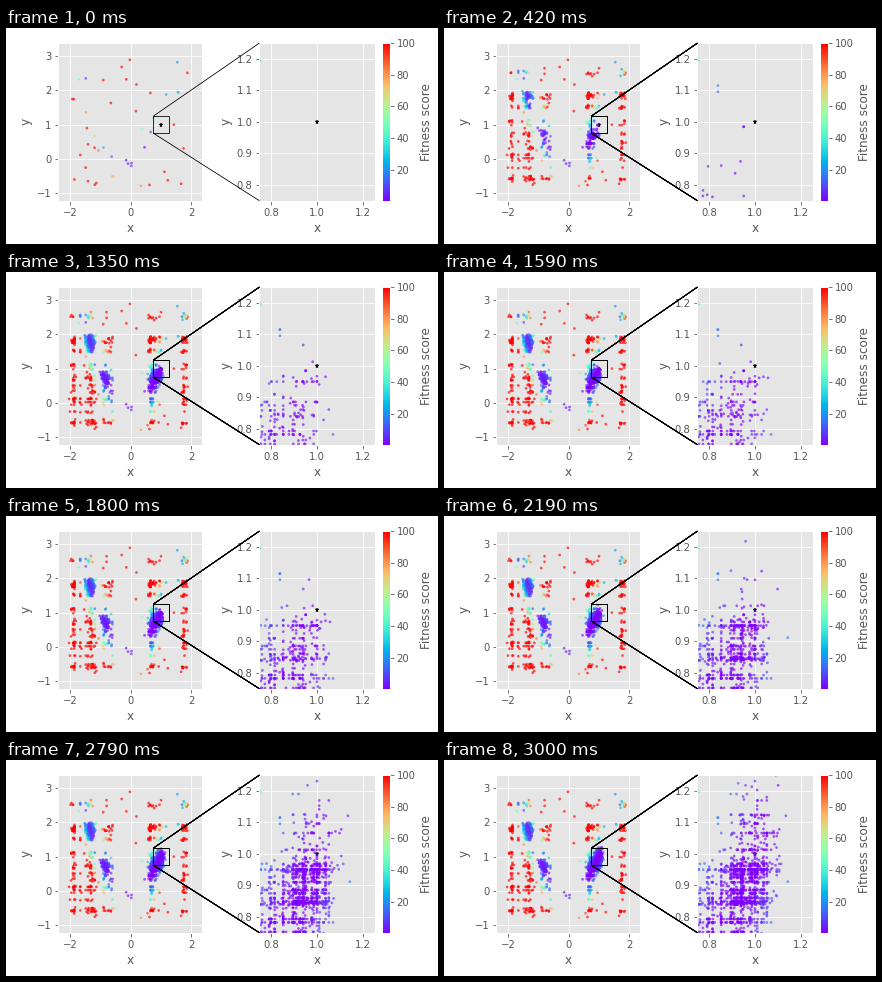
These frames come from a looping animation (432 by 216 pixels, 3030 ms). A matplotlib script:

```python
import numpy as np
import matplotlib.pyplot as plt
from matplotlib.animation import FuncAnimation
from matplotlib.cm import ScalarMappable
from matplotlib.colors import Normalize
from mpl_toolkits.axes_grid1.inset_locator import mark_inset

W, H, DPI = 432, 216, 72
FRAMES, STEP = 101, 30
POPULATION = 48
rng = np.random.default_rng(11)


def score(x, y):
    """Rosenbrock function, lowest at (1, 1)."""
    return (1 - x) ** 2 + 100 * (y - x * x) ** 2


def pool(mids, spread, each):
    """Genes scattered around a few centres."""
    return rng.normal(np.repeat(mids, each), spread)


def near(genes, mid, spread, n=300):
    """Genes drawn more often the closer they lie to mid."""
    p = np.exp(-((genes - mid) / spread) ** 2 / 2)
    return rng.choice(genes, n, p=p / p.sum())


def breed(first, last, n, xs, ys, temp=None, mutate=.35, sigma=.035):
    """Cross x and y genes, mutate some, keep mostly the fitter children."""
    m = n * 30 if temp else n
    x, y = rng.choice(xs, m), rng.choice(ys, m)
    x = x + rng.normal(0, sigma, m) * (rng.random(m) < mutate)
    y = y + rng.normal(0, sigma, m) * (rng.random(m) < mutate)
    if temp:
        fit = rng.random(m) < np.exp(-score(x, y) / temp)
        x, y = x[fit][:n], y[fit][:n]
    born = rng.integers(first, last + 1, len(x))
    return np.column_stack([born, x, y])


founders = np.column_stack([np.zeros(POPULATION),
                            rng.uniform(-2, 1.95, POPULATION),
                            rng.uniform(-.85, 2.9, POPULATION)])
cols = np.r_[pool([-1.9, -1.3, -1.3, -.85, .72, .72, 1.75], [.09], 5),
             founders[::8, 1], 1]
rows = np.r_[pool([2.6, 1.8, 1.8, 1.55, 1.1, .7, .4, 0, -.6], [.06], 4),
             founders[::8, 2]]
families = [founders,
            breed(1, 14, 380, cols, rows),
            breed(15, 34, 130, cols, rows),
            breed(5, 34, 90, pool(-1.32, .12, 14), pool(1.8, .14, 14), 30),
            breed(10, 38, 120, pool(-.85, .06, 14), pool(.7, .1, 14), 12)]

# The swarm climbs the valley y = x² towards the optimum
valley_x, valley_y = pool(.9, .13, 45), pool(.9, .22, 45)
for g in range(8, FRAMES, 8):
    mid = .68 + .0035 * g
    xs = np.r_[near(valley_x, mid, .1), np.full(g // 2, 1.0)]
    ys = np.r_[near(valley_y, mid ** 2, .15), np.full(g // 2, .95)]
    families.append(breed(g, min(g + 7, FRAMES - 1), 120 + g, xs, ys, 9))

births = np.vstack(families)
births = births[np.argsort(births[:, 0], kind="stable")]
born, points = births[:, 0], births[:, 1:]

norm = Normalize(.3, 100)
colors = plt.get_cmap("rainbow")(norm(score(*points.T)))
colors[:, 3] = .65
inside = np.all(np.abs(points - 1) < .26, axis=1)

plt.style.use("ggplot")
fig = plt.figure(figsize=(W / DPI, H / DPI), dpi=DPI, facecolor="white")


def panel(left, right):
    top, bottom = 15.1, 172.7
    return fig.add_axes([left / W, 1 - bottom / H,
                         (right - left) / W, (bottom - top) / H])


full, zoom, bar = panel(52.4, 196.2), panel(253.4, 368.5), panel(376.1, 383.7)
full.set(xlim=(-2.397, 2.364), ylim=(-1.215, 3.375), xticks=[-2, 0, 2],
         yticks=range(-1, 4), xlabel="x", ylabel="y")
zoom.set(xlim=(.75, 1.25), ylim=(.75, 1.25), xticks=[.8, 1, 1.2],
         yticks=[.8, .9, 1, 1.1, 1.2], xlabel="x", ylabel="y")
fig.colorbar(ScalarMappable(norm, "rainbow"), cax=bar, label="Fitness score",
             ticks=range(20, 101, 20))

clouds = []
for ax, keep in ((full, np.ones(len(points), bool)), (zoom, inside)):
    ax.plot(1, 1, "*", color="black", ms=5, mew=.3, zorder=2)
    dots = ax.scatter([], [], s=7.5, linewidths=0, zorder=2.5)
    clouds.append((dots, born[keep], points[keep], colors[keep]))

# The marker is redrawn every generation, so its soft edges darken
marks = [mark_inset(full, zoom, loc1=2, loc2=3, fc="none", ec="black",
                    lw=.8, zorder=3) for _ in range(8)]


def update(k):
    for dots, when, xy, rgba in clouds:
        n = np.searchsorted(when, k, side="right")
        dots.set_offsets(xy[:n])
        dots.set_facecolors(rgba[:n])
    for i, parts in enumerate(marks):
        for part in parts:
            part.set_visible(i <= k)
    return [c[0] for c in clouds]


anim = FuncAnimation(fig, update, frames=FRAMES, interval=STEP,
                     repeat=True, repeat_delay=0, blit=False)
plt.show()
```
